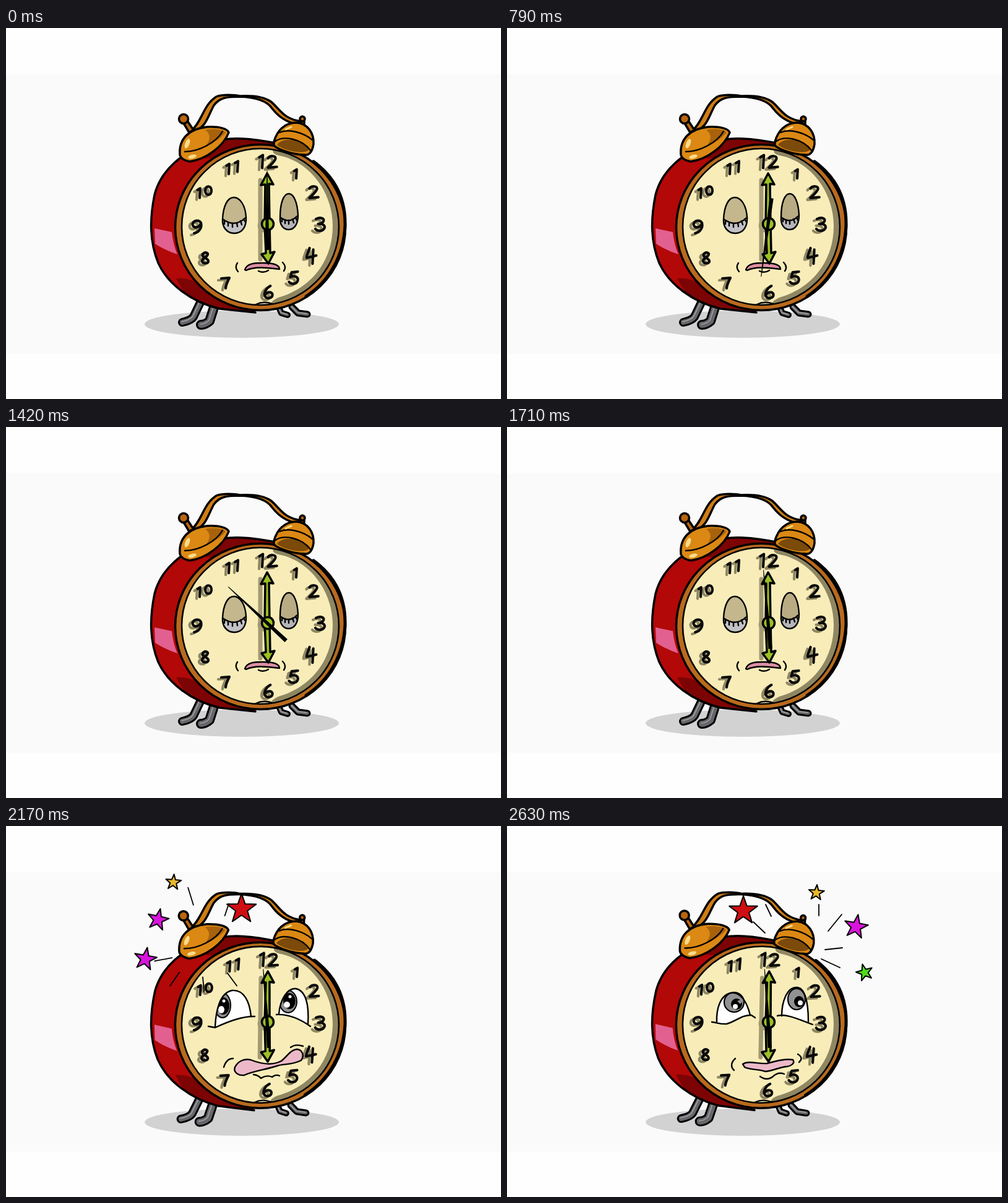
These frames come from a looping animation (800x600 px, 2710 ms). An HTML page:

```html
<!DOCTYPE html>
<html lang="en">
<head>
<meta charset="utf-8">
<title>Alarm clock</title>
<style>
html, body { margin: 0; width: 100%; height: 100%; overflow: hidden; background: #fdfefd; }
svg { display: block; width: 100vw; height: 100vh; }
.k { stroke: #000; stroke-width: 3.5; stroke-linejoin: round; stroke-linecap: round; }
.l { fill: none; stroke: #000; stroke-width: 2.4; stroke-linecap: round; stroke-linejoin: round; }
.digit { fill: none; stroke-width: 4.2; stroke-linecap: round; stroke-linejoin: round; }
.digit path { vector-effect: non-scaling-stroke; }
</style>
</head>
<body>
<svg viewBox="0 0 800 600">
  <defs>
    <clipPath id="bodyClip"><path d="M440 187C400 179 360 174 330 186C285 200 250 230 240 270C232 310 232 345 246 380C262 415 300 443 345 454L403 460L420 320Z"/></clipPath>
    <clipPath id="lookL"><path d="M338 325C339 300 345 270 365 266C385 264 394 285 396 308C380 308 355 318 338 325Z"/></clipPath>
    <clipPath id="lookR"><path d="M441 304C443 280 455 262 468 263C485 266 490 290 488 321C475 312 455 305 441 304Z"/></clipPath>
  </defs>
  <rect y="75" width="800" height="452" fill="#fbfafb"/>
  <ellipse cx="381" cy="479" rx="157" ry="22" fill="#d2d2d2"/>

  <g id="body">
    <g id="legs" fill="none" stroke-linecap="round" stroke-linejoin="round"></g>
    <g clip-path="url(#bodyClip)">
      <rect x="225" y="165" width="230" height="300" fill="#b20808"/>
      <path d="M345 172C330 186 338 196 310 210L450 215V180Z" fill="#7d0404"/>
      <path d="M275 405C300 402 330 420 350 445L410 462L330 465C300 445 285 425 275 405Z" fill="#7d0404"/>
      <path d="M240 324L268 330Q270 350 277 366Q258 360 241 349Z" fill="#e2608f"/>
    </g>
    <path class="k" fill="none" d="M440 187C400 179 360 174 330 186C285 200 250 230 240 270C232 310 232 345 246 380C262 415 300 443 345 454L403 460"/>
    <ellipse class="k" cx="411" cy="322.5" rx="137.5" ry="134" fill="#b96a1d"/>
    <path fill="none" stroke="#000" stroke-width="5" stroke-linecap="round" d="M497 216C534 243 549 280 548 320C546 365 525 408 485 434"/>
    <ellipse cx="411" cy="321.5" rx="127" ry="126.5" fill="#f8edb9"/>
    <path fill="#8f8762" d="M432 197A127 126.5 0 0 1 432 447C426 444 432 440 440 436C490 422 528 380 528 320C528 265 490 215 440 206C432 204 430 200 432 197Z"/>
    <ellipse cx="411" cy="321.5" rx="127" ry="126.5" fill="none" stroke="#000" stroke-width="2.6"/>
    <path class="l" stroke-width="4" d="M404 447Q416 441 430 446"/>
    <g class="digit" id="digitShade" stroke="#8f8762" transform="translate(-5 3)"></g>
    <g class="digit" id="digits" stroke="#0b0b0b"></g>
  </g>

  <g id="handShade" fill="none" stroke="#a39a72" stroke-width="7" stroke-linecap="round">
    <path d="M411 246V374"/><circle cx="417" cy="320" r="7"/>
  </g>

  <g id="asleep">
    <path d="M350 309C351 288 358 274 368 274C379 274 387 288 388 306Q371 324 350 309Z" fill="#c4b78d"/>
    <path d="M350 309Q371 324 388 306C389 322 381 332 369 332C357 332 349 322 350 309Z" fill="#c2c2c6"/>
    <path class="l" stroke-width="2" d="M350 309C351 288 358 274 368 274C379 274 387 288 388 306C389 322 381 332 369 332C357 332 349 322 350 309Q371 324 388 306M353 311V317M359 314V320M366 316V322M373 315L374 321M379 312L381 318M384 309L387 314"/>
    <path d="M443 306C443 282 449 268 457 268C465 268 471 282 472 303Q458 318 443 306Z" fill="#b9ac84"/>
    <path d="M443 306Q458 318 472 303C472 317 466 326 457 326C448 326 442 318 443 306Z" fill="#b5b5b9"/>
    <path class="l" stroke-width="2" d="M443 306C443 282 449 268 457 268C465 268 471 282 472 303C472 317 466 326 457 326C448 326 442 318 443 306Q458 318 472 303M446 308V313M451 310V316M457 311V317M463 309L465 315M468 306L470 311"/>
    <path class="l" fill="#dd8fa4" style="fill:#dd8fa4" d="M386 391C389 380 404 380 415 380C430 380 442 382 442 390C430 389 404 384 388 392Z"/>
    <path class="l" d="M374 380Q369 387 375 394M447 379Q454 386 449 393M408 393Q416 397 424 392"/>
  </g>

  <g id="lookLeft">
    <g clip-path="url(#lookL)">
      <rect x="330" y="260" width="75" height="70" fill="#fff"/>
      <ellipse cx="350" cy="290" rx="13" ry="20" fill="#8f8f8f" stroke="#000" stroke-width="2"/>
      <ellipse cx="351" cy="291" rx="10" ry="14"/>
      <ellipse cx="348" cy="297" rx="5" ry="6" fill="#fff"/><circle cx="352" cy="283" r="2.5" fill="#fff"/>
    </g>
    <g clip-path="url(#lookR)">
      <rect x="436" y="258" width="58" height="68" fill="#fff"/>
      <ellipse cx="456" cy="284" rx="14" ry="18" fill="#8f8f8f" stroke="#000" stroke-width="2"/>
      <ellipse cx="458" cy="283" rx="10" ry="13"/>
      <ellipse cx="454" cy="289" rx="5" ry="5" fill="#fff"/><circle cx="459" cy="276" r="2.5" fill="#fff"/>
    </g>
    <path class="l" d="M338 325C339 300 345 270 365 266C385 264 394 285 396 308M327 324L338 326C355 318 380 307 402 308M441 304C443 280 455 262 468 263C485 266 490 290 488 320M437 305C455 304 475 312 492 324"/>
    <path class="l" style="fill:#ecb9c8" d="M370 390C375 380 385 376 395 378C410 384 430 388 445 380C455 372 460 362 470 361C480 362 482 372 477 379C462 387 450 384 438 388C420 394 400 396 385 403C375 404 367 398 370 390Z"/>
    <path class="l" d="M352 390C355 380 360 376 367 376M460 358Q468 352 480 356M400 402Q408 403 412 408Q422 402 430 406Q436 401 442 404"/>
  </g>

  <g id="lookRight">
    <path fill="#fff" d="M339 318C338 295 345 273 362 270C378 268 388 285 393 306C380 305 370 316 355 320Z"/>
    <ellipse cx="367" cy="285" rx="16" ry="16" fill="#929292" stroke="#000" stroke-width="2.2"/>
    <circle cx="371" cy="288" r="9"/><circle cx="369" cy="292" r="4" fill="#fff"/><path d="M372 283L384 279L377 288Z" fill="#929292"/>
    <path fill="#fff" d="M444 307C444 285 452 261 468 261C480 261 487 280 487 317C470 311 458 305 444 307Z"/>
    <ellipse cx="468" cy="280" rx="14" ry="17" fill="#929292" stroke="#000" stroke-width="2.2"/>
    <ellipse cx="472" cy="284" rx="8" ry="9"/><circle cx="474" cy="286" r="4" fill="#fff"/>
    <path class="l" d="M339 318C338 295 345 273 362 270C378 268 388 285 393 306M331 317C340 318 345 321 355 320C370 316 380 305 395 306L401 310M444 307C444 285 452 261 468 261C480 261 487 280 487 316M437 307C450 303 470 312 494 321"/>
    <path class="l" style="fill:#ecb9c8" d="M381 385C390 379 405 385 420 384C435 380 450 376 462 378C466 383 460 388 452 389C440 390 430 396 418 397C405 393 390 394 384 390Z"/>
    <path class="l" d="M369 376C362 382 361 390 367 395M470 369C477 373 477 378 472 382M409 405Q420 413 430 405Q438 397 448 401"/>
  </g>

  <g id="hands">
    <g class="k" stroke-width="3" fill="#9cc022">
      <path d="M418 317L419 253L412 254L422 235L432 253L425 252L426 317Z"/>
      <path d="M418 317L420 364L413 366L424 381L434 362L427 364L426 317Z"/>
      <circle cx="423" cy="317" r="9.5"/>
    </g>
    <path id="needle" d="M-.5 -86L-2.6 0L-3.2 42L3.2 42L2.6 0L.5 -86Z"/>
  </g>

  <g id="bells">
    <path class="k" fill="#cf7d14" d="M299 167C318 150 318 125 340 111C350 107 370 108 378 110C395 109 415 110 428 119C442 130 448 148 478 151L480 156C455 156 440 143 430 130C422 118 405 112 378 111C355 111 345 113 336 125C325 145 325 158 303 169Z"/>
    <g class="k" fill="#b9650f">
      <path d="M296 169L287 154L293 150L303 165Z"/><circle cx="287" cy="147" r="7.5"/>
      <path d="M476 158L477 149H482L482 158Z"/><circle cx="479" cy="147" r="4"/>
    </g>
    <path class="k" fill="#db8814" d="M281 205C279 180 295 163 325 160C345 159 358 163 360 169C352 190 325 212 297 216C287 214 282 210 281 205Z"/>
    <path fill="#a9620c" d="M322 165C336 162 350 164 355 169C347 178 336 186 322 192C330 182 332 172 322 165Z"/>
    <path class="l" d="M289 200C312 200 340 185 350 167"/>
    <ellipse cx="293" cy="187" rx="3.5" ry="8" fill="#f8dc8a" transform="rotate(22 293 187)"/>
    <ellipse cx="301" cy="208" rx="7" ry="3" fill="#f8dc8a" transform="rotate(-15 301 208)"/>
    <path class="k" fill="#db8814" d="M433 184C438 166 450 153 470 153C488 155 498 170 497 188C495 200 490 207 482 205C465 205 440 197 433 190Z"/>
    <path fill="#7c4a0a" d="M438 189C448 175 476 180 490 196C484 206 450 199 438 189Z"/>
    <path class="l" stroke-width="3" d="M442 169C458 162 482 170 495 181M434 184C448 173 478 179 492 198"/>
    <path fill="none" stroke="#f8dc8a" stroke-width="3" stroke-linecap="round" d="M452 164L461 160"/>
  </g>
  <g id="sparks"></g>
</svg>
<script>
const el = id => document.getElementById(id);
const LOOP = 2710, FPS = 24;

const glyphs = {
  0: 'M0-7C-7-7-7 7 0 7C7 7 7-7 0-7',
  1: 'M-4-6L1-9L0 9',
  2: 'M-6-6C-3-10 6-10 5-5C4-1-2 4-6 8L7 7',
  3: 'M-6-8C0-11 7-9 4-4C2-1-1-1-3-1C4-2 8 2 5 6C2 10-5 9-7 6',
  4: 'M-2-10C-4-4-6 0-6 3L7 0M3-8L2 11',
  5: 'M6-9L-3-8L-5-1C0-4 7-2 6 4C4 10-4 10-7 6',
  6: 'M3-9C-3-6-7 1-5 6C-2 11 6 9 6 4C6-1-2-1-5 4',
  7: 'M-7-7L6-8C3-2 0 4 0 9',
  8: 'M4-7C0-11-6-7-4-3C-2 0 6 1 5 6C3 10-6 9-5 4C-4 0 5-2 4-7',
  9: 'M5-5C2-10-7-8-6-2C-5 3 4 2 5-5C7 2 2 8-4 9'
};
// digit, x, y, scale
const dial = [
  [1, 414, 216, 1.15], [2, 430, 217, 1.1], [1, 469, 236, .8], [2, 497, 266, 1.1],
  [3, 508, 318, 1.15], [4, 493, 368, 1.2], [5, 465, 404, 1.1], [6, 424, 427, 1.1],
  [7, 355, 412, 1], [8, 322, 372, 1], [9, 309, 321, 1.2], [1, 313, 267, .85],
  [0, 327, 263, .95], [1, 360, 228, .9], [1, 374, 224, .95]
];
el('digits').innerHTML = el('digitShade').innerHTML = dial.map(([d, x, y, s]) =>
  `<path d="${glyphs[d]}" transform="translate(${x} ${y}) scale(${s})"/>`).join('');

const legs = [
  ['M314 444L303 467Q299 473 285 476', 14], ['M336 452L329 474Q322 480 315 480', 16],
  ['M441 452L445 461L455 464', 10], ['M462 451L472 461L487 463', 11]
];
el('legs').innerHTML = legs.map(([d, w]) =>
  `<path d="${d}" stroke="#000" stroke-width="${w}"/>` +
  `<path d="${d}" stroke="#66666a" stroke-width="${w - 6}"/>` +
  `<path d="${d}" stroke="#a2a2a6" stroke-width="1.6" transform="translate(-1 -1)"/>`).join('');

const RED = '#d00d12', PINK = '#d814dc', GOLD = '#e8b92c', LIME = '#4fdc1e';
// Each burst: frames it lasts, frame of unit spread, bell position, stars and dashes
const bursts = [
  { from: 43, to: 53, mid: 48, at: [318, 185],
    stars: [[376, 138, 25, RED, 0], [251, 154, 18, PINK, 12], [232, 213, 19, PINK, 10], [274, 98, 13, GOLD, 5]],
    dashes: [[296, 106, 304, 132], [246, 216, 272, 211], [269, 253, 283, 233],
             [318, 240, 320, 262], [355, 234, 369, 253], [351, 148, 357, 130]] },
  { from: 53, to: 60, mid: 57, at: [465, 180],
    stars: [[470, 109, 25, RED, 0], [662, 137, 25, RED, 0], [564, 189, 19, PINK, 10],
            [510, 147, 13, GOLD, 5], [403, 148, 14, LIME, -20]],
    dashes: [[418, 148, 427, 165], [398, 160, 414, 172], [520, 177, 506, 191], [500, 207, 517, 205]] },
  { from: 60, to: 65, mid: 63, at: [465, 180],
    stars: [[382, 137, 24, RED, 0], [564, 163, 20, PINK, 10], [500, 108, 13, GOLD, 5], [578, 237, 14, LIME, -15]],
    dashes: [[418, 127, 427, 146], [374, 136, 390, 152], [398, 155, 417, 173], [504, 127, 504, 145],
             [541, 143, 519, 170], [514, 200, 542, 197], [508, 215, 538, 229]] }
];

function star(x, y, r, fill, turn) {
  let pts = '';
  for (let i = 0; i < 10; i++) {
    const a = i * Math.PI / 5 + turn * Math.PI / 180, d = i % 2 ? r * .4 : r;
    pts += `${(x + d * Math.sin(a)).toFixed(1)},${(y - d * Math.cos(a)).toFixed(1)} `;
  }
  return `<polygon points="${pts}" fill="${fill}" stroke="#000" stroke-width="2" stroke-linejoin="round"/>`;
}

function sparks(n) {
  const b = bursts.find(b => n >= b.from && n < b.to);
  if (!b) return '';
  const k = Math.min(1 + (n - b.mid) * .08, 1.08), [ox, oy] = b.at;
  const px = x => ox + (x - ox) * k, py = y => oy + (y - oy) * k;
  return b.dashes.map(([x1, y1, x2, y2]) =>
      `<path class="l" style="stroke-width:1.8" d="M${px(x1)} ${py(y1)}L${px(x2)} ${py(y2)}"/>`).join('') +
    b.stars.map(([x, y, r, c, a]) => star(px(x), py(y), r, c, a)).join('');
}

const sway = [[0, 0], [41, 0], [45, -3], [48, -1.2], [57, 3.4], [63, 1.2], [65, 0], [66, 0]];
function tilt(n) {
  const i = sway.findIndex(p => p[0] > n), [a, u] = sway[i - 1], [b, v] = sway[i];
  return u + (v - u) * (n - a) / (b - a);
}

const show = (id, on) => el(id).setAttribute('display', on ? 'inline' : 'none');
const turn = (id, a, x, y) => el(id).setAttribute('transform', `rotate(${a} ${x} ${y})`);

function draw(t) {
  const n = Math.min(63, Math.floor(t * FPS / 1000 + .1));
  const a = tilt(n);
  for (const id of ['body', 'hands', 'handShade']) turn(id, a, 422, 317);
  turn('bells', a, 405, 130);
  const spin = 355 * (1 - Math.pow(1 - Math.min(n / 41, 1), 1.207));
  el('needle').setAttribute('transform', `translate(422 317) rotate(${spin})`);
  show('asleep', n < 42);
  show('lookLeft', n >= 42 && n < 53);
  show('lookRight', n >= 53);
  el('sparks').innerHTML = sparks(n);
}

const start = performance.now();
function tick() {
  draw((performance.now() - start) % LOOP);
  requestAnimationFrame(tick);
}
draw(0);
requestAnimationFrame(tick);
</script>
</body>
</html>
```
